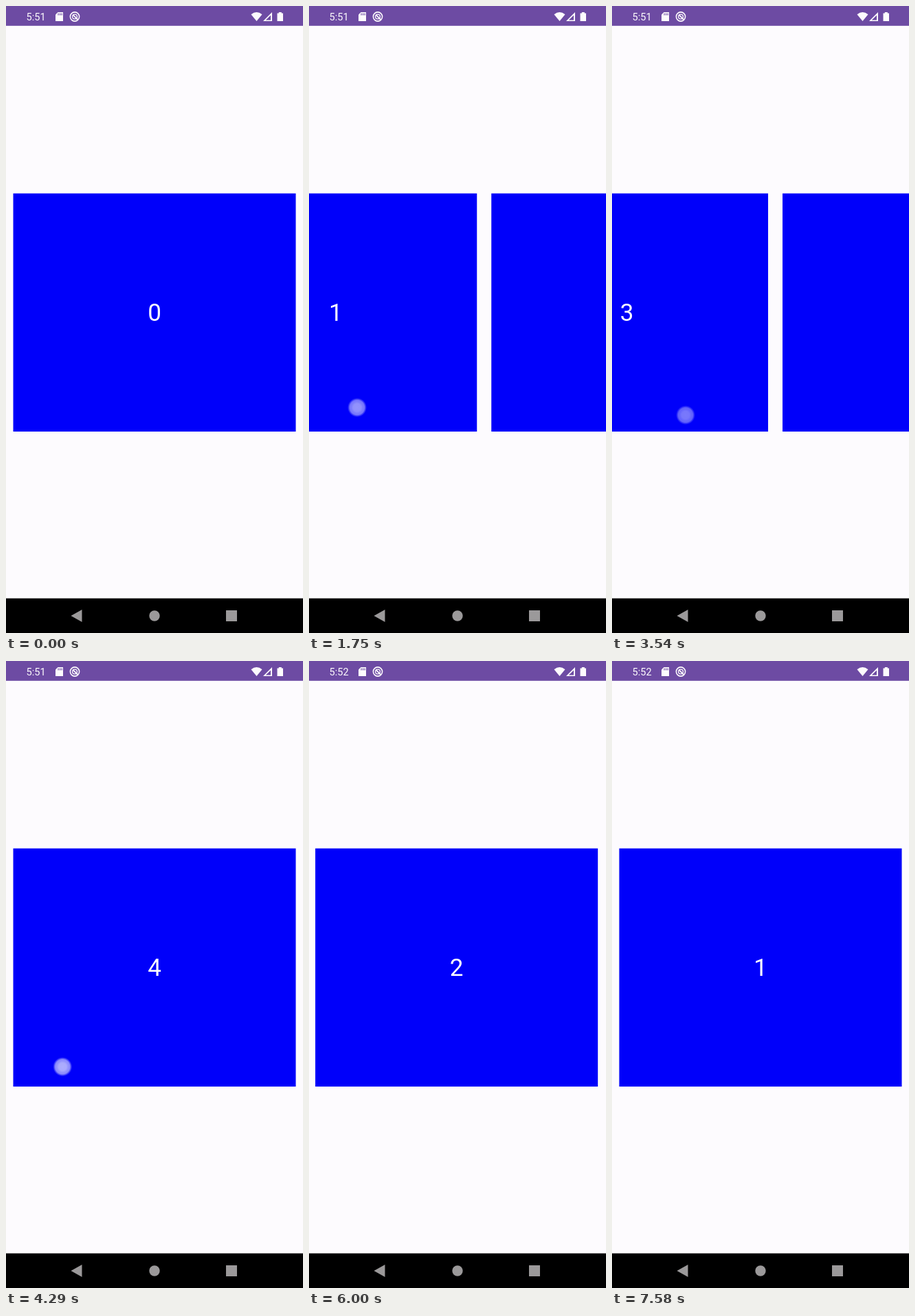
Animation of 432 by 912 pixels, one loop 8.08 s. Source, as an HTML page with a canvas:

```html
<!DOCTYPE html>
<html lang="en">
<head>
<meta charset="utf-8">
<title>Pager</title>
<style>
html, body { margin: 0; width: 100%; height: 100%; overflow: hidden; background: #fdfbfe; }
canvas { display: block; width: 432px; height: 912px; }
</style>
</head>
<body>
<canvas id="stage" width="432" height="912"></canvas>
<script>
const ctx = document.getElementById('stage').getContext('2d');
const LOOP = 8080, STEP = 1000 / 24, W = 432, H = 912, SLOP = 8;
const PRESS = 150, DRAG = 110, FADE = 330, SETTLE = 731;
const CLOCK_TICK = 4500;
const COLORS = { page: '#fdfbfe', card: '#0000fa', bar: '#6d4ba3', nav: '#9b999a', icon: '#fdfbfd' };

// at: release time, part: share of a page dragged by then, x/y: release point
const swipes = [
  { from: 0, dir: 1, at: 851.4, part: 0.345, x: 43, y: 576 },
  { from: 1, dir: 1, at: 1700, part: 0.28, x: 70, y: 584 },
  { from: 2, dir: 1, at: 2552, part: 0.26, x: 86, y: 590 },
  { from: 3, dir: 1, at: 3441.7, part: 0.2, x: 107, y: 595 },
  { from: 4, dir: -1, at: 4400, part: 0.27, x: 205, y: 602 },
  { from: 3, dir: -1, at: 5487, part: 0.25, x: 205, y: 602 },
  { from: 2, dir: -1, at: 6865, part: 0.25, x: 205, y: 602 }
];

const clamp = v => Math.max(0, Math.min(1, v));
const travel = s => s.part * W + SLOP;
const dragged = (s, t) => clamp((t - s.at + DRAG) / DRAG);

function progress(s, t) {
  if (t < s.at) return Math.max(0, travel(s) * dragged(s, t) - SLOP) / W;
  const rest = 1 - s.part;
  const left = 1 - clamp((t - s.at) / (SETTLE * rest));
  return 1 - rest * left * left;
}

function pagePosition(t) {
  let pos = 0;
  for (const s of swipes) {
    if (t >= s.at - DRAG) pos = s.from + s.dir * progress(s, t);
  }
  return pos;
}

function disc(x, y, r, fill) {
  ctx.fillStyle = fill;
  ctx.beginPath();
  ctx.arc(x, y, r, 0, Math.PI * 2);
  ctx.fill();
}

function ring(x, y, r, width) {
  ctx.lineWidth = width;
  ctx.beginPath();
  ctx.arc(x, y, r, 0, Math.PI * 2);
  ctx.stroke();
}

function polygon(fill, ...points) {
  ctx.fillStyle = fill;
  ctx.beginPath();
  points.forEach(([x, y]) => ctx.lineTo(x, y));
  ctx.closePath();
  ctx.fill();
}

function rect(x, y, w, h, fill) {
  ctx.fillStyle = fill;
  ctx.fillRect(x, y, w, h);
}

function text(str, x, y, size, align, fill) {
  ctx.font = `${size}px Roboto, sans-serif`;
  ctx.textAlign = align;
  ctx.fillStyle = fill;
  ctx.fillText(str, x, y);
}

function drawCards(pos) {
  const first = Math.floor(pos);
  for (let i = first; i <= first + 1; i++) {
    const left = (i - pos) * W;
    rect(left + 10.5, 272.6, 411, 346.4, COLORS.card);
    text(i, left + 216, 458, 35, 'center', '#fff');
  }
}

function drawTouch(t) {
  for (const s of swipes) {
    if (t < s.at - PRESS || t > s.at + FADE) continue;
    const back = 1 - dragged(s, t);
    const x = s.x + s.dir * travel(s) * back;
    const y = s.y + s.dir * 12 * back;
    const glow = ctx.createRadialGradient(x, y, 0, x, y, 14);
    glow.addColorStop(0, 'rgba(255,255,255,1)');
    glow.addColorStop(0.4, 'rgba(255,255,255,.98)');
    glow.addColorStop(0.6, 'rgba(255,255,255,.85)');
    glow.addColorStop(0.76, 'rgba(255,255,255,.8)');
    glow.addColorStop(1, 'rgba(205,205,255,0)');
    ctx.globalAlpha = 0.68 * (1 - clamp((t - s.at) / FADE));
    disc(x, y, 14, glow);
    ctx.globalAlpha = 1;
  }
}

function drawStatusBar(t) {
  const c = COLORS.icon;
  rect(0, 0, W, 28.8, COLORS.bar);
  text(t < CLOCK_TICK ? '5:51' : '5:52', 29.5, 21, 14.6, 'left', c);

  // memory card
  polygon(c, [75.5, 9], [83, 9], [83, 22], [72, 22], [72, 12.5]);
  for (const x of [75.5, 78, 80.5]) rect(x, 10.5, 1.2, 3, COLORS.bar);

  // round notification
  ctx.strokeStyle = c;
  ring(100, 15.5, 6.6, 1.6);
  ring(100, 15.5, 3.4, 1.3);
  ctx.lineWidth = 1.8;
  ctx.beginPath();
  ctx.moveTo(97.6, 13.1);
  ctx.lineTo(104.6, 20.1);
  ctx.stroke();

  // wifi
  ctx.fillStyle = c;
  ctx.beginPath();
  ctx.moveTo(364.5, 22);
  ctx.lineTo(356.5, 12.2);
  ctx.quadraticCurveTo(364.5, 6, 372.5, 12.2);
  ctx.fill();

  // signal
  polygon(c, [387, 9], [387, 22], [374, 22]);
  polygon(COLORS.bar, [385, 13.5], [385, 20.6], [377.8, 20.6]);

  // battery
  rect(394.5, 10.5, 8.5, 11.5, c);
  rect(396.8, 9, 4, 2, c);
}

function drawNavBar() {
  rect(0, 861.6, W, H - 861.6, '#000');
  polygon(COLORS.nav, [94.5, 887], [110.5, 878], [110.5, 896]);
  disc(216, 887, 7.7, COLORS.nav);
  rect(320, 879, 16, 16, COLORS.nav);
}

const snap = t => Math.floor((t + 5) / STEP) * STEP;

function frame(now) {
  const t = snap(now % LOOP);
  rect(0, 0, W, H, COLORS.page);
  drawCards(pagePosition(t));
  drawTouch(t);
  drawStatusBar(t);
  drawNavBar();
}

const start = performance.now();
function tick() {
  frame(performance.now() - start);
  requestAnimationFrame(tick);
}
tick();
</script>
</body>
</html>
```
